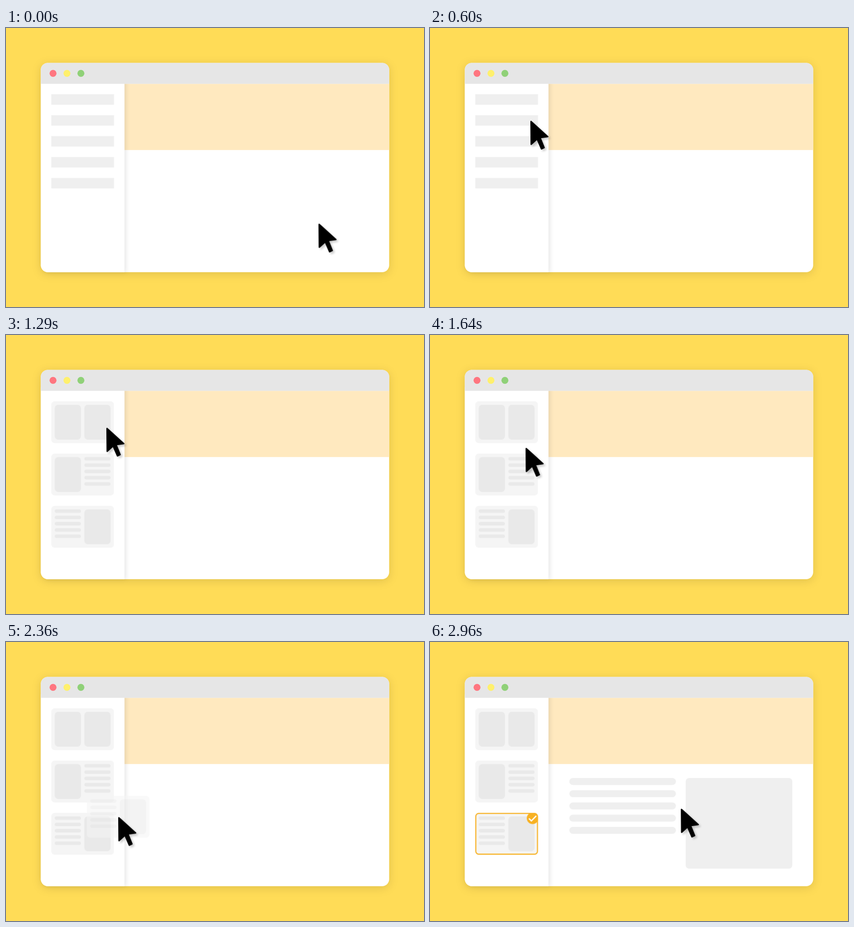
Recreate the animation shown at these times as an HTML page. Size 917 by 611 pixels, loop 3690 ms.

```html
<!DOCTYPE html>
<html lang="en">
<head>
<meta charset="utf-8">
<title>Drag a layout into the page</title>
<style>
  html, body { margin: 0; width: 100%; height: 100%; overflow: hidden; background: #ffdc57; }
  svg { display: block; width: 100%; height: 100%; }

  .window { fill: #fff; filter: drop-shadow(0 5px 13px rgba(0, 0, 0, .12)); }
  .sidebar { fill: #fff; filter: drop-shadow(5px 0 6px rgba(0, 0, 0, .09)); }
  .grey { fill: #efefef; }
  .card { fill: #f5f5f5; }
  .tile { fill: #e9e9e9; }
  .arrow { stroke: #000; stroke-width: 4; stroke-linejoin: round; filter: drop-shadow(5px 5px 3px rgba(0, 0, 0, .2)); }

  .x, .y, .bars, .cards, .wipe, .ripple, .ghost, .mark, .content {
    animation: 3690ms linear infinite both;
  }
  .x { animation-name: move-x; }
  .y { animation-name: move-y; }
  .bars { animation-name: bars; }
  .cards { animation-name: cards; }
  .wipe { animation-name: wipe, fade; }
  .wipe:nth-child(2) { animation-delay: 100ms; }
  .wipe:nth-child(3) { animation-delay: 200ms; }
  .ripple { animation-name: ripple; }
  .ghost { animation-name: ghost; }
  .mark { animation-name: mark; }
  .content { animation-name: content; }

  /* Paired x and y curves trace bezier paths */
  @keyframes move-x {
    0% { transform: translateX(897px); animation-timing-function: cubic-bezier(.3333, -.019, .6667, .374); }
    16.26%, 41.192% { transform: translateX(288px); }
    57.453%, 61.789% { transform: translateX(220px); animation-timing-function: cubic-bezier(.3333, .474, .6667, .942); }
    76.965%, 100% { transform: translateX(720px); }
  }
  @keyframes move-y {
    0% { transform: translateY(561px); animation-timing-function: cubic-bezier(.3333, .231, .6667, .669); }
    16.26%, 41.192% { transform: translateY(266px); }
    57.453%, 61.789% { transform: translateY(551px); animation-timing-function: cubic-bezier(.3333, 1.393, .6667, 4.214); }
    76.965%, 100% { transform: translateY(478px); }
  }
  @keyframes bars {
    0%, 22.6% { opacity: 1; }
    26%, 100% { opacity: 0; }
  }
  @keyframes cards {
    0%, 22.6% { opacity: 0; }
    22.61%, 100% { opacity: 1; }
  }
  @keyframes wipe {
    0%, 22.63% { clip-path: inset(0 100% 0 0); animation-timing-function: cubic-bezier(.7, 0, .3, 1); }
    29.4%, 100% { clip-path: inset(0 0 0 0); }
  }
  @keyframes fade {
    0%, 22.63% { opacity: 0; }
    29.4%, 100% { opacity: 1; }
  }
  @keyframes ripple {
    0%, 16.26% { transform: scale(0); opacity: .2; }
    22.7% { transform: scale(1); opacity: .05; }
    22.71%, 57.45% { transform: scale(0); opacity: 0; }
    57.453% { transform: scale(0); opacity: .2; }
    63.9% { transform: scale(1); opacity: .05; }
    63.91%, 100% { transform: scale(0); opacity: 0; }
  }
  @keyframes ghost {
    0%, 61.78% { opacity: 0; }
    61.79%, 70.46% { opacity: .55; }
    73.5%, 100% { opacity: 0; }
  }
  @keyframes mark {
    0%, 71.3% { opacity: 0; }
    80.1%, 100% { opacity: 1; }
  }
  @keyframes content {
    0%, 71.3% { opacity: 0; }
    80.1%, 100% { opacity: 1; }
  }
</style>
</head>
<body>
<svg viewBox="0 0 1200 800" preserveAspectRatio="none">
  <defs>
    <rect id="bar" class="grey" x="130" width="180" height="30"/>
    <rect id="card" class="card" width="180" height="120" rx="10"/>
    <rect id="tile" class="tile" y="10" width="75" height="100" rx="10"/>
    <g id="lines" class="tile">
      <rect y="10" width="75" height="10" rx="5"/>
      <rect y="28" width="75" height="10" rx="5"/>
      <rect y="46" width="75" height="10" rx="5"/>
      <rect y="64" width="75" height="10" rx="5"/>
      <rect y="82" width="75" height="10" rx="5"/>
    </g>
    <g id="text-left">
      <use href="#card"/><use href="#lines" x="10"/><use href="#tile" x="95"/>
    </g>
    <rect id="row" x="400" width="306" height="20" rx="10"/>
    <clipPath id="edge"><rect x="130" y="490" width="180" height="120" rx="10"/></clipPath>
  </defs>

  <rect class="window" x="100" y="100" width="1000" height="600" rx="20"/>
  <path fill="#ffe9bf" d="M340 160H1100V350H340Z"/>

  <g class="content">
    <g class="grey">
      <use href="#row" y="390"/>
      <use href="#row" y="425"/>
      <use href="#row" y="460"/>
      <use href="#row" y="495"/>
      <use href="#row" y="530"/>
      <rect x="734" y="390" width="306" height="260" rx="10"/>
    </g>
  </g>

  <path class="sidebar" d="M100 150H340V700H120A20 20 0 0 1 100 680Z"/>
  <path fill="#e6e6e6" d="M100 160V120A20 20 0 0 1 120 100H1080A20 20 0 0 1 1100 120V160Z"/>
  <circle cx="135" cy="130" r="10" fill="#ff7680"/>
  <circle cx="175" cy="130" r="10" fill="#fff06c"/>
  <circle cx="215" cy="130" r="10" fill="#90d178"/>

  <g class="bars">
    <use href="#bar" y="190"/>
    <use href="#bar" y="250"/>
    <use href="#bar" y="310"/>
    <use href="#bar" y="370"/>
    <use href="#bar" y="430"/>
  </g>

  <g class="cards">
    <g class="wipe"><g transform="translate(130 190)">
      <use href="#card"/><use href="#tile" x="10"/><use href="#tile" x="95"/>
    </g></g>
    <g class="wipe"><g transform="translate(130 340)">
      <use href="#card"/><use href="#tile" x="10"/><use href="#lines" x="95"/>
    </g></g>
    <g class="wipe"><use href="#text-left" x="130" y="490"/></g>
  </g>

  <g class="mark">
    <rect x="131.5" y="491.5" width="177" height="117" rx="8.5" fill="none" stroke="#f8b122" stroke-width="3"/>
    <circle cx="294.5" cy="505.5" r="16.7" fill="#f8b122" clip-path="url(#edge)"/>
    <path d="M284 506L291 513L305 498.5" fill="none" stroke="#fff" stroke-width="3.5"/>
  </g>

  <g class="x"><g class="y">
    <g class="ghost"><use href="#text-left" x="-90" y="-61"/></g>
    <circle class="ripple" r="48.5"/>
    <path class="arrow" d="M2 2L50 45.5L28 48.5L39.5 77L32 80.5L19.5 52L2.5 67.5Z"/>
  </g></g>
</svg>
</body>
</html>
```
